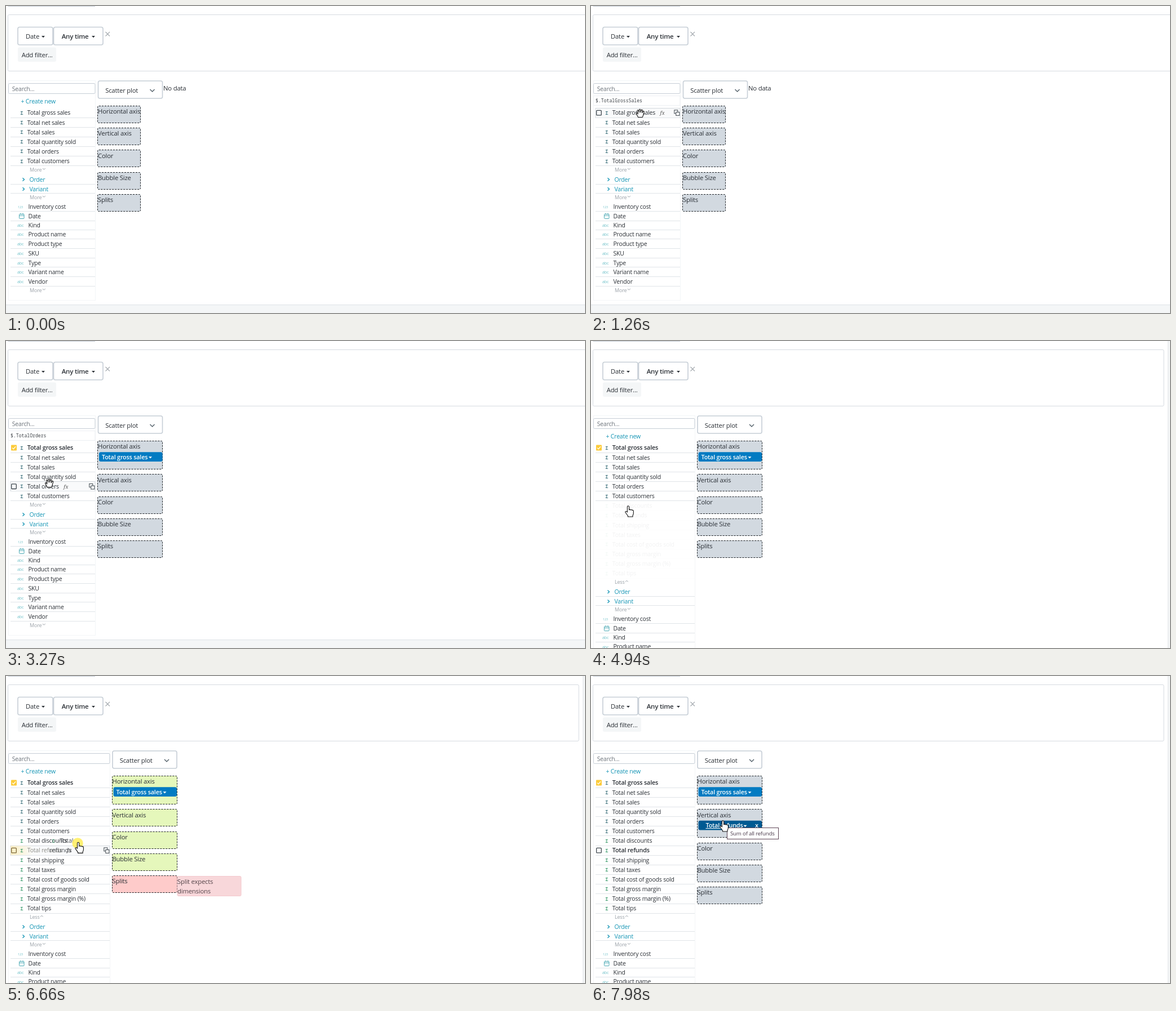
Write an HTML page that moves like this. It is 1027 px wide and 545 px high and loops after 8000 ms.

```html
<!DOCTYPE html>
<html lang="en">
<head>
<meta charset="utf-8">
<title>Scatter plot builder</title>
<style>
  html, body { margin: 0; width: 100%; height: 100%; overflow: hidden; background: #fff; }
  svg { display: block; width: 100%; height: 100%; }
  text { font: 10.5px "Open Sans", "Noto Sans", sans-serif; letter-spacing: -.2px; fill: #2b3036; white-space: pre; }
  .ui { font-size: 11.3px; }
  .bold { font-size: 10.8px; font-weight: 600; }
  .strong { font-size: 11.5px; font-weight: 600; }
  .link { fill: #1294b4; }
  .muted { font-size: 9px; fill: #9aa1a8; }
  .sigma { font-size: 8px; font-weight: 600; fill: #2b6470; }
  .green { fill: #2b9360; }
  .kind { font-size: 7.2px; fill: #6fc0c8; }
  .num { font-size: 5.6px; }
  .code { font: 8.15px "Noto Sans Mono", "DejaVu Sans Mono", monospace; letter-spacing: 0; fill: #3c4146; }
  .fx { font: italic 9px "Noto Serif", "Liberation Serif", serif; letter-spacing: .4px; fill: #555; }
  .white { fill: #fff; }
  .dim { fill: #8d8d88; }
  .tip { font-size: 9.7px; fill: #4a3a4a; }
  .box { fill: #fff; stroke: #c6ced6; }
  .thick { stroke-width: 1.6; }
  .rule { stroke: #e0e4e8; }
  .faint { fill: none; stroke: #f3f5f7; }
  .grey { fill: #f4f6f7; }
  .zone { box-sizing: border-box; height: 100%; border: 1px dashed #212529; border-radius: 3px; }
  .mark { fill: none; stroke: #3d464d; stroke-width: 1.3; }
  .cursor { fill: #fff; stroke: #111; stroke-width: 1.1; stroke-linejoin: round; }
</style>
</head>
<body>
<svg id="stage" viewBox="0 0 1027 545" preserveAspectRatio="none">
  <g id="scene"></g>
  <g id="pointer"></g>
</svg>
<script>
const LOOP = 8000, ROW = 17.15, TOP = 181.2;
const measures = ['gross sales', 'net sales', 'sales', 'quantity sold', 'orders', 'customers',
  'discounts', 'refunds', 'shipping', 'taxes', 'cost of goods sold', 'gross margin',
  'gross margin (%)', 'tips'].map(s => 'Total ' + s);
const fields = [['Inventory cost', 356], ['Date', 373], ['Kind', 389], ['Product name', 405.3],
  ['Product type', 422], ['SKU', 439.3], ['Type', 455.7], ['Variant name', 472], ['Vendor', 489.3]];
const zones = ['Horizontal axis', 'Vertical axis', 'Color', 'Bubble Size', 'Splits'];

// Cursor hot spot: time, x, y
const path = [[50, 888, 515], [640, 102, 221], [840, 101, 218], [870, 101, 218], [1250, 87, 190.5],
  [2440, 87, 190.5], [2460, 87.5, 190.5], [2700, 87.5, 190.5], [3270, 76.5, 252.5], [3420, 76.5, 252.5],
  [4040, 66, 293], [5540, 66, 293], [5740, 71, 304], [6150, 71, 304], [6780, 134, 294.5],
  [6810, 134, 294.5], [7090, 234, 257]];
const shapes = {
  arrow: 'M0 0V16L3.7 12.6 6.2 18.4 8.6 17.4 6.1 11.7H11Z',
  hand: 'M-1.6 10.8V1.4a1.6 1.6 0 0 1 3.2 0V7c.2-1.2 2.6-1.2 2.8.2c.3-1 2.5-.9 2.7.5c.4-.9 2.2-.7 2.2.9V13c0 2-1.3 3-1.3 4.2V19H-.5V17.5L-4.8 11.5c-1.2-1.6.6-3 2-1.8z',
  grab: 'M-3.5 7C-4 4.5-7.5 1-6.8-.4c.8-1.3 2.4.3 3.2 1.6L-5-4.2c-.3-1.8 1.8-2.2 2.3-.6l.9 3.2L-1.6-6c0-1.7 2.4-1.7 2.4 0l.2 4.4L2.2-5.4c.4-1.5 2.5-1 2.2.6L3.8-.8 5.2-3.2c.8-1.3 2.4-.4 1.9 1C6 1.5 5.6 4.5 4.2 7z'
};

const clamp = v => Math.max(0, Math.min(1, v));
const within = (t, a, b) => t >= a && t < b;
const snap = y => Math.floor(y) + .5;
const text = (x, y, s, cls = '', more = '') => `<text x="${x}" y="${y}" class="${cls}" ${more}>${s}</text>`;
const rect = (x, y, w, h, cls = '', more = '') =>
  `<rect x="${x}" y="${y}" width="${w}" height="${h}" class="${cls}" ${more}/>`;
const rule = (y, right) => `<path class="rule" d="M8 ${snap(y)}H${right}"/>`;
const mark = (d, more = '') => `<path class="mark" d="${d}" ${more}/>`;
const caret = (x, y, color = '#2b3036') => `<path d="M${x} ${y}h6l-3 3.2z" fill="${color}"/>`;
const dashed = (x, y, w, h, fill) =>
  `<foreignObject x="${x}" y="${y}" width="${w}" height="${h}"><div class="zone" style="background:${fill}"></div></foreignObject>`;

function cursorAt(t) {
  let i = 0;
  while (i < path.length - 1 && t >= path[i + 1][0]) i++;
  const a = path[i], b = path[i + 1] || a;
  const p = clamp((t - a[0]) / (b[0] - a[0] || 1)), e = p * p * (3 - 2 * p);
  return { x: a[1] + (b[1] - a[1]) * e, y: a[2] + (b[2] - a[2]) * e };
}

function hoverAt(t, c) {
  if (t < 50 || within(t, 4040, 5550) || t >= 7980) return -1;
  if (t >= 6000) return 7;
  const row = Math.floor((c.y - TOP) / ROW);
  return c.x < 158 && row >= 0 && row < (t < 4940 ? 6 : 14) ? row : -1;
}

function filters(wide) {
  return rect(4, -10, 153.5, 10.5, 'box')
    + rect(3.5, 15.5, wide ? 1012.5 : 1040, 100, 'box', 'rx="2" style="stroke:#d5dae0"')
    + rect(21, 37.5, 62, 31.5, 'box thick', 'rx="3"') + text(35, 58.2, 'Date', 'ui') + caret(63, 53)
    + rect(84.5, 37.5, 87.5, 31.5, 'box thick', 'rx="3"') + text(98.7, 58.2, 'Any time', 'strong') + caret(152, 53)
    + mark('M176.5 46l7.5 7.5m0-7.5l-7.5 7.5', 'style="stroke:#a3a9ae;stroke-width:1.1"')
    + rect(21, 73.5, 68, 25.5, 'grey', 'rx="3"') + text(27.7, 90.5, 'Add filter...', 'ui');
}

function checkbox(y, done, tint) {
  return done
    ? rect(9, y - 5, 10, 10, '', 'rx="1" fill="#fccb3a"') + mark(`M11 ${y}l2.2 2.3 4-4.6`, 'style="stroke:#fff"')
    : rect(9.7, y - 4.3, 8.6, 8.6, 'mark', `rx="1" ${tint ? 'style="stroke:#7b6636"' : ''}`);
}

function measure(i, s) {
  const y = TOP + 8.4 + i * ROW, hot = i === s.hover;
  const drag = i === 7 && s.drag;
  const tint = drag || (i === 0 && s.adding);
  const bold = (i === 0 && s.added) || (i === 7 && s.done);
  let out = '';
  if (hot) out += rect(8, snap(y - 8.5), s.right - 8, 17, '', 'fill="#f9fafb" stroke="#d3d8dd"');
  if (tint) out += rect(8.5, y - 8, 40, 16, '', 'fill="url(#glow)"');
  if (hot || bold) out += checkbox(y, i === 0 && s.checked, tint);
  out += text(25.7, y + 3.2, 'Σ', 'sigma' + (i > 5 ? ' green' : ''));
  out += text(37.8, y + 3.8, measures[i] + (hot ? '<tspan class="fx" dx="8.5">fx</tspan>' : ''),
    (bold ? 'bold' : '') + (drag ? ' dim' : ''));
  if (hot) {
    out += rect(s.right - 10.2, y - 4.8, 6, 6, 'mark', 'style="stroke-width:1"')
      + rect(s.right - 7.2, y - 1.2, 6, 6, 'mark', 'style="stroke-width:1;fill:#fff"');
  }
  out += rule(y + 8.6, s.right);
  return i > 5 ? `<g opacity="${s.fade}">${out}</g>` : out;
}

function more(y, label, up) {
  const d = up ? -2 : 2;
  return text(42, y + 3.2, label, 'muted')
    + mark(`M${up ? 61 : 65} ${y - 1.3 - d / 2}l2.4 ${d} 2.4 ${-d}`, 'style="stroke:#9aa1a8;stroke-width:1"');
}

function group(y, label) {
  return mark(`M29.5 ${y - 2.8}l3 2.8-3 2.8`, 'style="stroke:#1294b4"')
    + text(41.5, y + 3.8, label, 'link', 'style="font-weight:500"');
}

function sidebar(s) {
  const shift = s.wide ? 8 * ROW : 0, r = s.right;
  let out = rect(4.5, 132.5, r - 4, s.wide ? 420 : 390, 'faint')
    + rect(4.5, 137.5, r - 4.5, 18, 'box', 'rx="2"') + text(10.8, 150.6, 'Search...', '', 'style="fill:#6d747b"');
  if (s.hover >= 0 && !s.drag) {
    const name = measures[s.hover].replace(/[^a-z ]/gi, '').replace(/(^| )(\w)/g, (m, a, b) => b.toUpperCase());
    out += rect(4.5, 159.5, r - 4.5, 17, 'faint', 'style="stroke:#eceff2"') + text(8, 170.7, '$.' + name, 'code');
  } else {
    out += text(26.5, 173.2, '+ Create new', 'link');
  }
  const count = s.wide ? 14 : 6;
  for (let i = 0; i < count; i++) if (i !== s.hover) out += measure(i, s);
  if (s.hover >= 0) out += measure(s.hover, s);
  out += more(290.5 + shift, s.wide ? 'Less' : 'More', s.wide)
    + group(308 + shift, 'Order') + rule(316.3 + shift, r)
    + group(325 + shift, 'Variant') + rule(332.4 + shift, r) + more(339.5 + shift, 'More');
  fields.forEach(([name, at], i) => {
    const y = at + shift;
    if (i === 1) {
      out += rect(23.5, y - 3.5, 8.5, 8, '', 'rx="1" fill="none" stroke="#4aa9b4"')
        + `<path d="M23.5 ${y - 1}h8.5M25.5 ${y - 5}v2m4.5-2v2" stroke="#4aa9b4"/>`;
    } else {
      out += text(i ? 20 : 21, y + 3, i ? 'abc' : '123', 'kind' + (i ? '' : ' num'));
    }
    out += text(39.5, y + 3.8, name) + rule(y + 8.2, r);
  });
  return out + more(504.3 + shift, 'More');
}

function pill(x, y, label, active) {
  const at = active ? 15.5 : 7.5;
  return rect(x + 2.5, y, 112.5, 16.8, '', `rx="3" fill="${active ? '#005a92' : '#027bc2'}"`)
    + text(x + at, y + 12.3, label, 'bold white', active ? 'text-decoration="underline"' : '')
    + caret(x + (active ? 82.5 : 90.5), y + 8, '#fff')
    + (active ? text(x + 103, y + 12.3, 'x', 'bold white') : '');
}

function chart(s) {
  const x = s.wide ? 188 : 162.5, w = s.added ? 116 : 77;
  let y = 177.5;
  let out = rect(x + 1, 133, 114, 31, 'box thick', 'rx="3"') + text(x + 13.7, 153.7, 'Scatter plot', 'ui')
    + mark(`M${x + 93} 148l4 4 4-4`, 'style="stroke:#59666f;stroke-width:1.5"');
  if (s.empty) out += text(279, 150.4, 'No data', 'ui');
  zones.forEach((name, i) => {
    const slots = i === 0 ? +s.added : i === 1 ? s.slots : 0;
    const h = 30.5 + slots * 20.2;
    const fill = !s.drag ? '#d2d9e0' : i === 4 ? '#fecbca' : '#e5f7bb';
    out += dashed(Math.floor(x), Math.floor(y), w, Math.round(h), fill) + text(x + .5, y + 13.6, name, 'ui');
    if (i === 0 && s.added) out += pill(x, y + 19.8, measures[0]);
    if (i === 1 && (s.done || s.slots > 1)) out += pill(x, y + 19.8, measures[7], s.done);
    if (i === 4 && s.drag) {
      out += rect(x + 116, y + 1, 113, 35, '', 'rx="2" fill="#f8d7da" stroke="#f4c9ce"')
        + text(x + 116, y + 14.6, 'Split expects', 'ui', 'style="fill:#55454a"')
        + text(x + 116, y + 31.6, 'dimensions', 'ui', 'style="fill:#55454a"');
    }
    y += h + 8.7;
  });
  return out;
}

function scene(s) {
  let out = '<defs><linearGradient id="glow"><stop offset="0" stop-color="#fbefc2"/>'
    + '<stop offset=".35" stop-color="#fbf3d6"/><stop offset="1" stop-color="#fbf3d6" stop-opacity="0"/></linearGradient></defs>';
  out += s.wide
    ? rect(1023.5, -1, 10, 550, 'grey', 'stroke="#e1e5e9"')
    : rect(-1, 530.5, 1030, 20, 'grey', 'stroke="#dde2e6"');
  out += filters(s.wide) + sidebar(s) + chart(s);
  if (s.tip) {
    out += `<g opacity="${s.tip}">` + rect(16, 207, 117, 26, '', 'rx="3" fill="#666"')
      + text(22.5, 223.8, 'Sum of all gross sales', 'white', 'style="font-size:10.8px"') + '</g>';
  }
  if (s.done) out += rect(241.5, 269.5, 91, 20, '', 'fill="#fff" stroke="#5d4455"') + text(247, 283.2, 'Sum of all refunds', 'tip');
  return out;
}

function pointer(t, c, hover, drag) {
  if (t < 50) return '';
  const link = t >= 6000 || within(t, 3430, 5550) && c.y > 284 || hover === 2 && within(c.x, 92, 108);
  const shape = link ? 'hand' : hover >= 0 ? 'grab' : 'arrow';
  const pressed = within(t, 1680, 1760) || within(t, 4430, 4500) || within(t, 6000, 7430);
  let out = '';
  if (drag) {
    out += '<g opacity=".8">' + text(-46, .6, 'Σ', 'sigma green') + text(-33, 1, 'Total', 'ui')
      + text(-51, 18, 'refunds', 'ui') + '</g>';
  }
  if (pressed) out += '<circle cx="-1" cy="1.5" r="9.7" fill="#ffec50" opacity=".8"/>';
  return `<g transform="translate(${c.x.toFixed(1)} ${c.y.toFixed(1)})">${out}<path class="cursor" d="${shapes[shape]}"/></g>`;
}

const layers = ['scene', 'pointer'].map(id => ({ el: document.getElementById(id), html: '' }));
function show(layer, html) {
  if (layer.html !== html) layer.el.innerHTML = layer.html = html;
}

function draw(t) {
  const c = cursorAt(t), hover = hoverAt(t, c), wide = t >= 4940;
  const drag = within(t, 6050, 7980), over = drag && c.x > 188 && c.y < 268;
  const s = {
    hover, wide, drag,
    right: wide ? 184 : 158,
    added: t >= 1740, adding: within(t, 1700, 2270), checked: t >= 2270,
    empty: t < 2200,
    fade: clamp((t - 4925) / 270).toFixed(2),
    tip: t < 2710 ? +clamp((t - 1480) / 150).toFixed(2) : 0,
    done: t >= 7980,
    slots: within(t, 7940, 7980) ? 2 : t >= 7980 || over ? 1 : 0
  };
  show(layers[0], scene(s));
  show(layers[1], pointer(t, c, hover, drag && t < 7940));
}

const start = performance.now();
function tick() {
  draw((performance.now() - start) % LOOP);
  requestAnimationFrame(tick);
}
tick();
</script>
</body>
</html>
```
